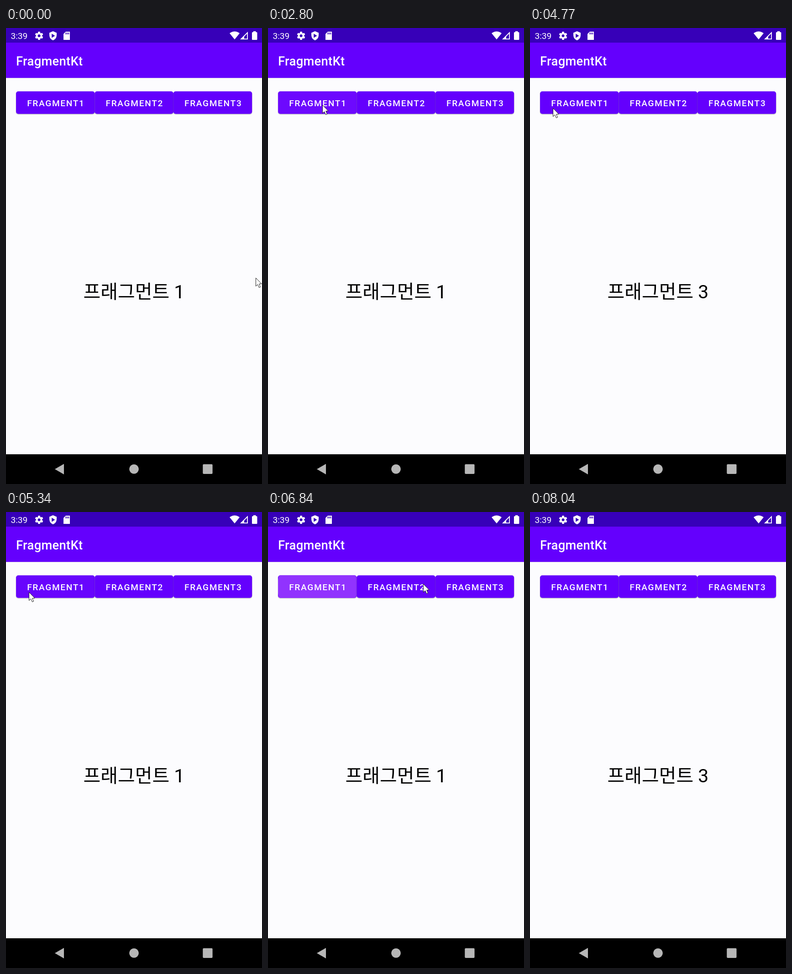
Write an HTML page with a canvas that moves like this. It is 561 px wide and 997 px high and loops after 8370 ms.

```html
<!DOCTYPE html>
<html lang="ko">
<head>
<meta charset="utf-8">
<title>FragmentKt</title>
<style>
  html, body { margin: 0; width: 100%; height: 100%; overflow: hidden; background: #fcfcfe; }
  canvas { display: block; width: 561px; height: 997px; }
</style>
</head>
<body>
<canvas id="stage" width="561" height="997"></canvas>
<script>
const ctx = document.getElementById('stage').getContext('2d');
const LOOP = 8370;
const SANS = 'Roboto, "Noto Sans CJK KR", "Noto Sans CJK", sans-serif';
const PRIMARY = '#6400fd', DARK = '#3700b8', LIT = '145, 51, 254';
const BUTTON = { x: 22, y: 138.5, w: 172.4, h: 49.2, r: 5 };
const RELEASE = 100, ENTER = 225, FADE = 130;

// The pointer rests between glides.
const START = { x: 547, y: 546 };
const glide = (start, end, x, y) => ({ start, end, x, y });
const GLIDES = [
  glide(30, 860, 29, 234),
  glide(1240, 1770, 133, 207),
  glide(1930, 2300, 106, 168),
  glide(2700, 3230, 238, 168),
  glide(3430, 3670, 452, 163),
  glide(4600, 4770, 50, 175),
  glide(5410, 5500, 361, 162),
  glide(5740, 5920, 293, 164),
  glide(6610, 6680, 110, 166),
  glide(6760, 6840, 340, 157),
  glide(6860, 7000, 446, 165),
  glide(7480, 7770, 563, 30)
];

// Buttons are pressed in turn, with one detour back to the first.
const PRESSES = [2470, 3320, 3980, 5000, 5965, 6680, 7180].map((at, i) => ({
  at, button: i < 5 ? i % 3 : (i - 5) * 2
}));

const clamp = v => Math.min(1, Math.max(0, v));
const mix = (a, b, p) => a + (b - a) * p;
const smooth = p => p * p * (3 - 2 * p);

function rect(x, y, w, h, color) {
  ctx.fillStyle = color;
  ctx.fillRect(x, y, w, h);
}

function round(x, y, w, h, r, color) {
  ctx.beginPath();
  ctx.roundRect(x, y, w, h, r);
  ctx.fillStyle = color;
  ctx.fill();
}

function disc(x, y, r, color) {
  ctx.beginPath();
  ctx.arc(x, y, r, 0, Math.PI * 2);
  ctx.fillStyle = color;
  ctx.fill();
}

function shape(points, color) {
  ctx.beginPath();
  points.forEach(([x, y]) => ctx.lineTo(x, y));
  ctx.closePath();
  ctx.fillStyle = color;
  ctx.fill();
}

function label(text, x, y, size, weight, color, align = 'left', spacing = 0) {
  ctx.font = `${weight} ${size}px ${SANS}`;
  ctx.letterSpacing = spacing + 'px';
  ctx.textAlign = align;
  ctx.fillStyle = color;
  ctx.fillText(text, x, y);
}

function gear(x, y) {
  ctx.save();
  ctx.translate(x, y);
  for (let i = 0; i < 6; i++) {
    shape([[-3, -5], [-2, -9], [2, -9], [3, -5]], '#fff');
    ctx.rotate(Math.PI / 3);
  }
  disc(0, 0, 6.6, '#fff');
  disc(0, 0, 3, DARK);
  ctx.restore();
}

function shield(x, y) {
  ctx.beginPath();
  ctx.moveTo(x, y - 10);
  ctx.lineTo(x + 8, y - 6.5);
  ctx.lineTo(x + 8, y - 1);
  ctx.quadraticCurveTo(x + 7.5, y + 7, x, y + 10);
  ctx.quadraticCurveTo(x - 7.5, y + 7, x - 8, y - 1);
  ctx.lineTo(x - 8, y - 6.5);
  ctx.fillStyle = '#fff';
  ctx.fill();
  shape([[x - 2.8, y - 4.5], [x + 4.4, y], [x - 2.8, y + 4.5]], DARK);
}

function memoryCard(x, y) {
  shape([[x + 5, y], [x + 14, y], [x + 14, y + 18], [x, y + 18], [x, y + 5]], '#fff');
  for (let i = 0; i < 3; i++) rect(x + 4.5 + i * 3, y + 2, 1.6, 4, DARK);
}

function wifi(x, y) {
  ctx.beginPath();
  ctx.moveTo(x, y);
  ctx.lineTo(x - 11, y - 13.5);
  ctx.quadraticCurveTo(x, y - 21.5, x + 11, y - 13.5);
  ctx.fillStyle = '#fff';
  ctx.fill();
}

function signal(x, y) {
  shape([[x, y], [x + 17, y - 17], [x + 17, y]], '#fff');
  shape([[x + 9, y - 6.2], [x + 15.2, y - 12.5], [x + 15.2, y - 1.8], [x + 9, y - 1.8]], DARK);
}

function battery(x, y) {
  round(x, y + 2, 11.5, 17, 1.5, '#fff');
  rect(x + 3, y, 5.5, 3, '#fff');
}

function statusBar() {
  rect(0, 0, 561, 32, DARK);
  label('3:39', 10.5, 23.5, 19.1, 400, '#fff');
  gear(72.5, 17);
  shield(103, 17);
  memoryCard(126, 8);
  wifi(501, 25);
  signal(513, 25);
  battery(539, 7);
}

function toolbar() {
  rect(0, 32, 561, 77, PRIMARY);
  rect(0, 109, 561, 1, 'rgba(70, 0, 170, 0.2)');
  label('FragmentKt', 22, 81.5, 27.3, 500, '#fff', 'left', 0.34);
}

function navigationBar() {
  const gray = '#b7b7b7';
  rect(0, 932, 561, 65, '#000');
  shape([[107, 964.5], [127, 953], [127, 976]], gray);
  disc(280.5, 964.3, 10.4, gray);
  round(431.3, 953.7, 21.3, 21.3, 2, gray);
}

function pointerAt(t) {
  let at = START;
  for (const move of GLIDES) {
    const p = smooth(clamp((t - move.start) / (move.end - move.start)));
    at = { x: mix(at.x, move.x, p), y: mix(at.y, move.y, p) };
  }
  return at;
}

function ripple(press, left, t) {
  const age = t - press.at;
  if (age < 0 || age > ENTER + FADE) return;
  const { y, w, h, r } = BUTTON;
  const touch = pointerAt(press.at);
  const grow = 1 - (1 - clamp(age / ENTER)) ** 2;
  const alpha = clamp(age / 60) * (1 - clamp((age - ENTER) / FADE));
  ctx.save();
  ctx.beginPath();
  ctx.roundRect(left, y, w, h, r);
  ctx.clip();
  disc(mix(touch.x, left + w / 2, grow), mix(touch.y, y + h / 2, grow),
    mix(w * 0.3, Math.hypot(w, h) / 2 + 1, grow), `rgba(${LIT}, ${alpha})`);
  ctx.restore();
}

function button(index, t) {
  const { x, y, w, h, r } = BUTTON;
  const left = x + index * w;
  ctx.save();
  ctx.shadowColor = 'rgba(0, 0, 0, 0.3)';
  ctx.shadowBlur = 2;
  ctx.shadowOffsetY = 1;
  round(left, y, w, h, r, PRIMARY);
  ctx.restore();
  PRESSES.filter(p => p.button === index).forEach(p => ripple(p, left, t));
  label('FRAGMENT' + (index + 1), left + w / 2 + 1.2, 171, 19.1, 500, '#fff', 'center', 1.7);
}

function pointer(t) {
  const { x, y } = pointerAt(t);
  ctx.save();
  ctx.translate(Math.round(x) + 0.5, Math.round(y) + 0.5);
  shape([[0, 0], [0, 18], [4, 14.3], [7, 21], [10, 19.8], [7.2, 13.2], [12.5, 12.8]], '#fff');
  ctx.strokeStyle = '#222';
  ctx.lineWidth = 1;
  ctx.stroke();
  ctx.restore();
}

function draw(t) {
  rect(0, 0, 561, 997, '#fcfcfe');
  statusBar();
  toolbar();
  for (let i = 0; i < 3; i++) button(i, t);

  const last = PRESSES.filter(p => t >= p.at + RELEASE).pop();
  const page = last ? last.button + 1 : 1;
  label('프래그먼트 ' + page, 280.5, 590.5, 41, 400, '#000', 'center');

  navigationBar();
  pointer(t);
}

function frame() {
  draw(performance.now() % LOOP);
  requestAnimationFrame(frame);
}
frame();
</script>
</body>
</html>
```
